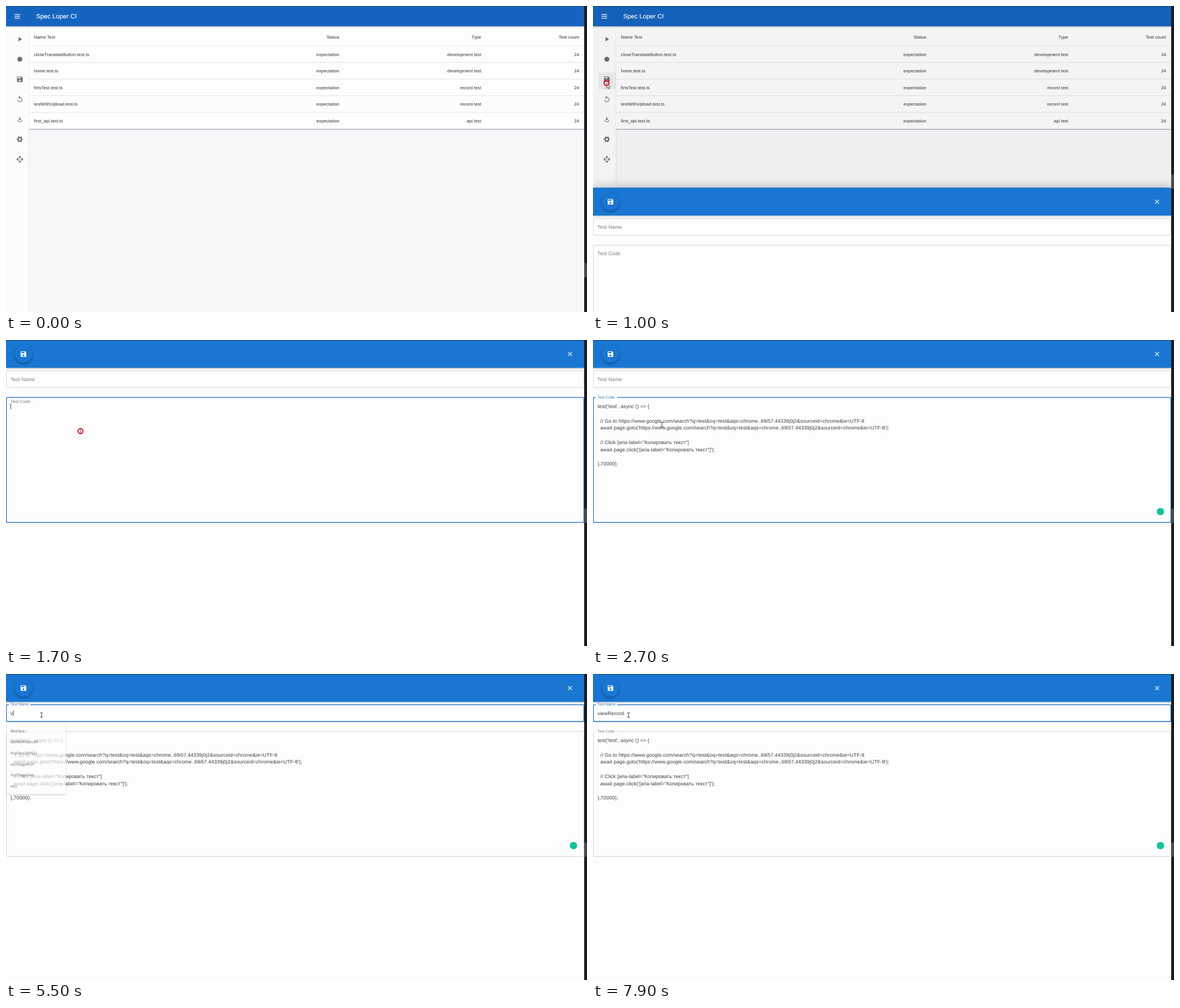
Write an HTML page that moves like this. It is 1030 px wide and 544 px high and loops after 8000 ms.

```html
<!DOCTYPE html>
<html lang="en">
<head>
<meta charset="utf-8">
<title>Test list</title>
<style>
  html, body { margin: 0; height: 100%; overflow: hidden; background: #fdfdfd; }
  svg { display: block; width: 100vw; height: 100vh; }
  text { font: 8.89px "Liberation Sans", Arial, sans-serif; letter-spacing: .0094em;
         fill: #3c3c3c; white-space: pre; text-rendering: geometricPrecision; }
  .cell text { font-size: 7.78px; letter-spacing: .0107em; fill: #2e2e2e; }
  .end { text-anchor: end; }
  .title { font-size: 11.1px; letter-spacing: .0075em; fill: #fff; stroke: #fff; stroke-width: .2px; }
  .menu text { font: 600 6.8px "Open Sans", sans-serif; font-weight: 500; letter-spacing: 0; fill: #222; }
  .line { stroke: #dedede; stroke-width: .8; }
  .box { fill: none; }
  .icons { fill: #6f6f6f; }
  .stroke { fill: none; stroke: #6f6f6f; }
  .bar { filter: drop-shadow(0 1.5px 1.5px rgba(0,0,0,.3)); }
</style>
</head>
<body>
<svg id="stage" viewBox="0 0 1030 544" preserveAspectRatio="none"></svg>
<script>
const DURATION = 8000, STEP = 100;
const BLUE = '#1976d2', DARK_BLUE = '#1565c0';

const ICONS = {
  play: '<path d="M8 5v14l11-7z"/>',
  record: '<circle cx="12" cy="12" r="8"/>',
  save: '<path d="M17 3H5c-1.1 0-2 .9-2 2v14c0 1.1.9 2 2 2h14c1.1 0 2-.9 2-2V7zm-5 16a3 3 0 1 1 0-6 3 3 0 0 1 0 6zm3-10H5V5h10z"/>',
  replay: '<path d="M12 5V1L7 6l5 5V7a6 6 0 1 1-6 6H4a8 8 0 1 0 8-8z"/>',
  load: '<path class="stroke" stroke-width="2" d="M12 4v10M8 10l4 4 4-4M5 14a7 6 0 0 0 14 0"/>',
  gear: '<circle class="stroke" cx="12" cy="12" r="5.5" stroke-width="4"/>' +
    '<circle class="stroke" cx="12" cy="12" r="8.2" stroke-width="3.2" stroke-dasharray="4.2 4.387" stroke-dashoffset="2.1"/>',
  api: '<path d="M14 12l-2 2-2-2 2-2zM12 6l2.1 2.1 2.5-2.5L12 1 7.4 5.6l2.5 2.5zM6 12l2.1-2.1-2.5-2.5L1 12l4.6 4.6 2.5-2.5zM18 12l-2.1 2.1 2.5 2.5L23 12l-4.6-4.6-2.5 2.5zM12 18l-2.1-2.1-2.5 2.5L12 23l4.6-4.6-2.5-2.5z"/>',
  close: '<path d="M19 6.4L17.6 5 12 10.6 6.4 5 5 6.4l5.6 5.6L5 17.6 6.4 19l5.6-5.6 5.6 5.6 1.4-1.4-5.6-5.6z"/>'
};

const ROWS = [
  ['Name Test', 'Status', 'Type', 'Test count'],
  ['closeTranslateButton.test.ts', 'expectation', 'development test', 24],
  ['home.test.ts', 'expectation', 'development test', 24],
  ['firtsTest.test.ts', 'expectation', 'record test', 24],
  ['testWithUpload.test.ts', 'expectation', 'record test', 24],
  ['first_api.test.ts', 'expectation', 'api test', 24]
];
const COLUMNS = [49.5, 591, 842.5, 1016];

const URL_TEXT = 'https://www.google.com/search?q=test&amp;oq=test&amp;aqs=chrome..69i57.44339j0j2&amp;sourceid=chrome&amp;ie=UTF-8';
const CODE = [
  "test('test', async () => {", '',
  `  // Go to ${URL_TEXT}`,
  `  await page.goto('${URL_TEXT}');`, '',
  '  // Click [aria-label="Копировать текст"]',
  `  await page.click('[aria-label="Копировать текст"]');`, '',
  '},70000);'
];
const HINTS = ['firtsTest', 'testWithUpload', 'firstTest200921', 'testStagefirst', 'firstTsageTest', 'test'];

// Times in ms
const POINTER = [[100, 271, 24], [200, 222, 42], [300, 155, 72], [400, 92, 103], [500, 46, 127],
  [600, 28, 135], [700, 24, 137], [1200, 24, 137], [1600, 132, 162], [2600, 132, 162],
  [3400, 54, 70], [3500, 52, 68], [3700, 52, 68], [4200, 63, 73]];
const DRAWER = [[900, 544], [1000, 323], [1100, 55.5], [1200, 3], [1300, 0]];
const SHADE = [[900, 0], [1000, .035], [1100, .47]];
const CLICKS = [[900, 1200], [1600, 1900], [3500, 3800]];
const TYPING = [[5500, 1], [5900, 3], [6000, 4], [6500, 5], [6600, 6], [6800, 7], [7000, 8], [7100, 9], [7300, 10]];
const FOCUS_CODE = 1700, PASTE = 2100, FOCUS_NAME = 3600;

const icon = (name, x, y, fill = '') =>
  `<g transform="translate(${x - 6.67} ${y - 6.67}) scale(.5556)" ${fill && `fill="${fill}"`}>${ICONS[name]}</g>`;
const text = (x, y, s, attrs = '') => `<text x="${x}" y="${y}" ${attrs}>${s}</text>`;

const sidebar = ['play', 'record', 'save', 'replay', 'load', 'gear', 'api']
  .map((name, i) => icon(name, 24.5, 59 + i * 35.6)).join('');
const table = ROWS.map((row, i) => {
  const y = i ? 59 + i * 29.5 : 58;
  return row.map((s, c) => text(COLUMNS[c], y, s, c ? 'class="end"' : '')).join('') +
    (i < 5 ? `<path class="line" d="M41 ${71 + i * 29.5}H1025"/>` : '');
}).join('');
const field = (id, y, h, label) =>
  `<rect id="${id}Box" class="box" x=".5" y="${y}" width="1024" height="${h}" rx="2"/>
   <rect id="${id}Notch" x="5" y="${y - 1.5}" width="38" height="3" fill="#fdfdfd"/>` +
  text(0, 0, label, `id="${id}Label"`);

stage.innerHTML = `
  <rect width="1030" height="544" fill="#f8f8fa"/>
  <rect y="36" width="41" height="508" fill="#fcfcfc"/>
  <path class="line" d="M41 36V544"/>
  <rect x="41" y="36" width="984" height="183" fill="#fdfdfd"/>
  <path d="M41 219.3H1025" stroke="#b3afc6" stroke-width="1.5"/>
  <rect id="hover" x="9" y="118" width="32" height="30" fill="#000" fill-opacity=".055"/>
  <g class="icons">${sidebar}</g>
  <g class="cell">${table}</g>
  <rect class="bar" width="1025" height="36" fill="${DARK_BLUE}"/>
  <path d="M15 15.2H25M15 18.4H25M15 21.6H25" stroke="#fff" stroke-width="1.2"/>
  ${text(53.5, 22.3, 'Spec Loper CI', 'class="title"')}
  <rect id="shade" width="1025" height="544"/>
  <g id="drawer">
    <rect width="1025" height="544" fill="#fdfdfd" style="filter:drop-shadow(0 0 9px rgba(0,0,0,.3))"/>
    <rect class="bar" width="1025" height="49.5" fill="${BLUE}"/>
    <circle cx="31" cy="25" r="15.5" fill="${BLUE}" style="filter:drop-shadow(0 2px 2px rgba(0,0,0,.35))"/>
    ${icon('save', 31, 25, '#fff')}${icon('close', 1000, 25, '#fff')}
    ${field('name', 54.7, 29.8, 'Test Name')}
    ${field('code', 102.2, 222.2, 'Test Code')}
    <g id="script">${CODE.map((s, i) => text(8, 121 + i * 12.78, s)).join('')}</g>
    <circle id="badge" cx="1006" cy="305" r="6.6" fill="#15c39a"/>
    ${text(8, 73, '', 'id="typed"')}
    <rect id="caret" width=".9" height="10.5" fill="#333"/>
    <g id="menu" class="menu">
      <rect y="87" width="107" height="128" fill="#fefefe" style="filter:drop-shadow(0 1px 1.5px rgba(0,0,0,.3))"/>
      ${HINTS.map((s, i) => text(7, 102.8 + i * 20, s)).join('')}
    </g>
  </g>
  <path d="M0 .4H1030" stroke="#1c2c40" stroke-width=".8"/>
  <rect x="1025" width="5" height="544" fill="#1c1c1e"/>
  <rect id="thumb" x="1025" width="5" height="25.5" fill="#4a4a4c"/>
  <g id="pointer">
    <path id="arrow" d="M0 0V9.2L2.2 7.3 3.8 10.8 5.3 10.1 3.8 6.8H6.6Z" fill="#fff" stroke="#222" stroke-width=".7"/>
    <path id="beam" d="M-2.5 -4H-.6L0 -3.5 .6 -4H2.5M0 -3.5V3.5M-2.5 4H-.6L0 3.5 .6 4H2.5" fill="none" stroke="#222" stroke-width=".9"/>
    <circle id="ring" r="4.4" fill="none" stroke="#d0101c" stroke-width="2"/>
  </g>`;

const el = id => document.getElementById(id);
const set = (id, attrs) => { for (const k in attrs) el(id).setAttribute(k, attrs[k]); };
const show = (id, on) => set(id, { visibility: on ? 'inherit' : 'hidden' });

// Linear interpolation through [time, ...values] keys
function along(keys, t) {
  const i = keys.findIndex(k => k[0] > t);
  if (i < 1) return keys[i ? keys.length - 1 : 0].slice(1);
  const a = keys[i - 1], b = keys[i], p = (t - a[0]) / (b[0] - a[0]);
  return a.slice(1).map((v, j) => v + (b[j + 1] - v) * p);
}

function drawField(id, top, float, focused, hovered) {
  set(id + 'Box', {
    stroke: focused ? DARK_BLUE : hovered ? '#333' : '#c8c8c8',
    'stroke-width': focused ? 1.3 : .8
  });
  set(id + 'Label', {
    transform: `translate(8 ${top + 18 - 16.3 * float}) scale(${1 - .25 * float})`,
    style: `fill:${focused && float === 1 ? '#3a75b5' : '#7c7c7c'}`
  });
  show(id + 'Notch', float === 1);
}

const floatAt = (t, start) => t < start ? 0 : t < start + STEP ? .5 : 1;

function drawCaret(t, x, y, since) {
  set('caret', { x, y });
  show('caret', since && Math.floor((t - since) / 500) % 2 === 0);
}

function draw(t) {
  const [x, y] = along(POINTER, t), [top] = along(DRAWER, t);
  const onName = t >= FOCUS_NAME, onCode = t >= FOCUS_CODE && !onName;

  show('hover', t >= 500 && t < 1300);
  set('shade', { opacity: along(SHADE, t)[0] });
  set('drawer', { transform: `translate(0 ${top})` });
  show('drawer', t > 900);
  set('thumb', { y: t < 900 ? 457 : 299.5 });

  drawField('name', 54.7, floatAt(t, FOCUS_NAME), onName, y < 84 && t > 2600);
  drawField('code', 102.2, floatAt(t, FOCUS_CODE), onCode, false);
  show('script', t >= PASTE);
  show('badge', t >= 1900);

  const key = TYPING.filter(k => k[0] <= t).pop();
  el('typed').textContent = key ? 'viewRecord'.slice(0, key[1]) : '';
  if (onName) {
    const width = key ? el('typed').getComputedTextLength() : 0;
    drawCaret(t, 8 + width, 64.6, key ? Math.min(key[0] + 100, t) : Math.min(3700, t));
  } else if (t >= PASTE) drawCaret(t, 44.5, 215, PASTE);
  else drawCaret(t, 8, 112.6, onCode ? FOCUS_CODE : 0);

  const fade = t < 5500 ? 0 : t < 5600 ? 1 : 2;
  set('menu', {
    opacity: [1, .65, .2][fade],
    transform: `translate(53 151) scale(${1 - .02 * fade}) translate(-53 -151)`
  });
  show('menu', onName && t < 5700);

  const overText = t >= 1300;
  set('pointer', { transform: `translate(${x} ${y})` });
  show('pointer', t >= 100);
  show('arrow', !overText);
  show('beam', overText);
  show('ring', CLICKS.some(([a, b]) => t >= a && t < b));
}

const start = performance.now();
function tick() {
  const t = (performance.now() - start) % DURATION;
  draw(Math.floor(t / STEP) * STEP);
  requestAnimationFrame(tick);
}
tick();
</script>
</body>
</html>
```
